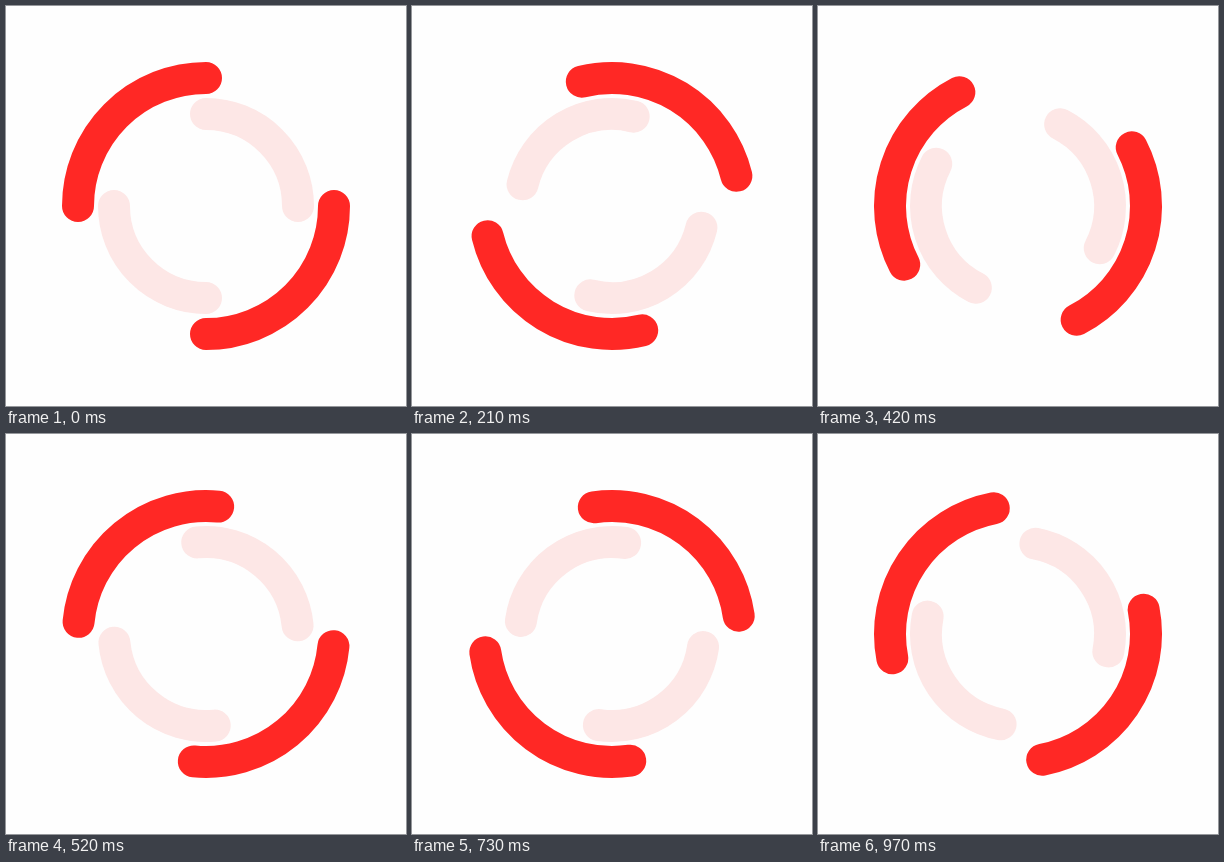
Write an HTML page that moves like this. It is 400 px wide and 400 px high and loops after 1000 ms.

```html
<!DOCTYPE html>
<html>
<head>
<meta charset="utf-8">
<style>
html, body { margin: 0; width: 100%; height: 100%; overflow: hidden; background: #fefefe; }
svg { display: block; width: 100%; height: 100%; }
path { fill: none; stroke-width: 32; stroke-linecap: round; }
</style>
</head>
<body>
<svg viewBox="-200 -200 400 400">
  <path id="outer" stroke="#ff2825" d="M-128 0A128 128 0 0 1 0-128M128 0A128 128 0 0 1 0 128"/>
  <path id="inner" stroke="#fde7e6" d="M0-92A92 92 0 0 1 92 0M0 92A92 92 0 0 1-92 0"/>
</svg>
<script>
const outer = document.getElementById('outer');
const inner = document.getElementById('inner');
const STEPS = 33;

// Steps of 30 ms; the middle one lasts 40 ms to fill the second.
const stepAt = t => t < 520 ? Math.min(16, Math.floor(t / 30)) : Math.floor((t - 10) / 30);

function draw() {
  const angle = stepAt(performance.now() % 1000) * 360 / STEPS;
  outer.setAttribute('transform', `rotate(${angle})`);
  inner.setAttribute('transform', `rotate(${-angle})`);
  requestAnimationFrame(draw);
}
draw();
</script>
</body>
</html>
```
